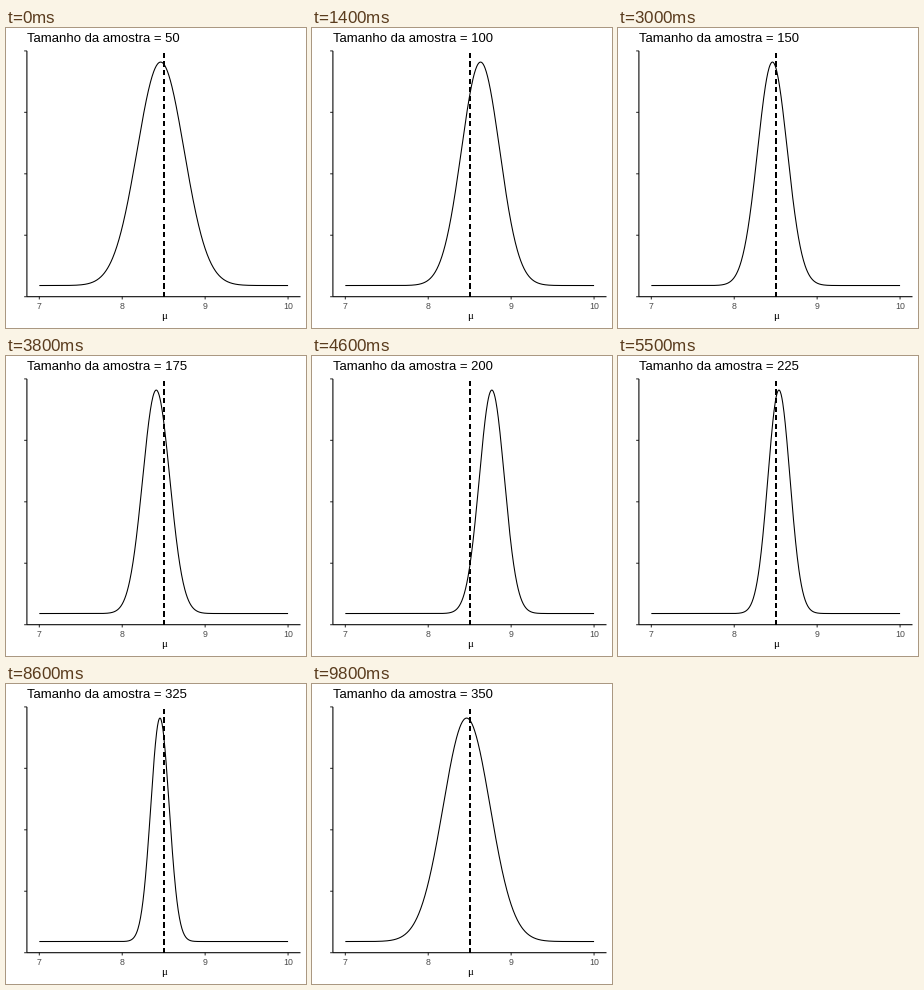
Write a matplotlib script that moves like this. It is 300x300 px and loops after 10 s.

```python
import math

import matplotlib.pyplot as plt
import numpy as np
from matplotlib.animation import FuncAnimation
from matplotlib.patches import Rectangle

SIZE, DPI = 300, 100
FRAMES, INTERVAL = 100, 100
PT = 72 / DPI          # points per pixel
STROKE = 1.067         # line width in pixels

# Panel edges in pixels, with a 5 % margin around the data
LEFT, RIGHT, TOP, BOTTOM = 20.9, 294.5, 22.9, 268.7
X_MIN, X_MAX, TRUE_MEAN, SD = 7, 10, 8.5, 2
UNIT = (RIGHT - LEFT) / 1.1 / (X_MAX - X_MIN)
Y_PAD = (BOTTOM - TOP) * 0.05 / 1.1
BASE, PEAK = BOTTOM - Y_PAD, TOP + Y_PAD

SAMPLE_SIZES = range(50, 351, 25)
MEANS = [8.463, 8.631, 8.757, 8.461, 8.410, 8.767, 8.331,
         8.539, 8.390, 8.739, 8.759, 8.455, 8.460]

# First frame of each state; the title mostly runs one frame ahead
TITLE_STARTS = [0, *range(6, 79, 8), 86, 93]
CURVE_STARTS = [0, *range(7, 80, 8), 86, 93, 98]


def to_px(x):
    return LEFT + (x - X_MIN) * UNIT + (RIGHT - LEFT) * 0.05 / 1.1


def state_at(frame, starts):
    return (sum(start <= frame for start in starts) - 1) % len(MEANS)


def line(xs, ys, color="black"):
    return ax.plot(xs, ys, color=color, lw=STROKE * PT, snap=False,
                   solid_capstyle="butt", solid_joinstyle="round")[0]


def label(x, y, text, size, color="black", ha="center", font="Liberation Sans"):
    return ax.text(x, y, text, fontsize=size * PT, color=color, ha=ha,
                   va="baseline", family=font)


fig = plt.figure(figsize=(SIZE / DPI, SIZE / DPI), dpi=DPI, facecolor="white")
ax = fig.add_axes([0, 0, 1, 1])
ax.set(xlim=(0, SIZE), ylim=(SIZE, 0))
ax.set_autoscale_on(False)
ax.axis("off")

# Axes and ticks
TICK = 2.74
for y in np.linspace(TOP, BOTTOM, 5):
    line([LEFT - TICK, LEFT], [y, y], "#333333")
for value in range(X_MIN, X_MAX + 1):
    x = to_px(value)
    line([x, x], [BOTTOM, BOTTOM + TICK], "#333333")
    label(x, 281, str(value), 8.8, "#4d4d4d")
line([LEFT, LEFT], [TOP, BOTTOM])
line([LEFT, RIGHT], [BOTTOM, BOTTOM])
label(to_px(TRUE_MEAN), 291, "\u03bc", 11, font="Liberation Serif")

# Dashed line at the true mean, on whole pixels, rising from the x axis
DASH = 4 * STROKE
mean_left = math.floor(to_px(TRUE_MEAN) - STROKE / 2)
for start in np.arange(BOTTOM, TOP + DASH, -2 * DASH):
    top, bottom = math.floor(start - DASH), math.ceil(start)
    ax.add_patch(Rectangle((mean_left, top), 2, bottom - top, color="black",
                           lw=0, antialiased=False))

grid = np.linspace(X_MIN, X_MAX, 601)
curve = line(to_px(grid), np.full_like(grid, BASE))
title = label(21, 14, "", 13.1, ha="left")


def update(frame):
    title.set_text(f"Tamanho da amostra = {SAMPLE_SIZES[state_at(frame, TITLE_STARTS)]}")
    state = state_at(frame, CURVE_STARTS)
    z = (grid - MEANS[state]) * math.sqrt(SAMPLE_SIZES[state]) / SD
    curve.set_ydata(BASE - (BASE - PEAK) * np.exp(-z ** 2 / 2))
    return curve, title


anim = FuncAnimation(fig, update, frames=FRAMES, interval=INTERVAL,
                     repeat=True, repeat_delay=0)
plt.show()
```
